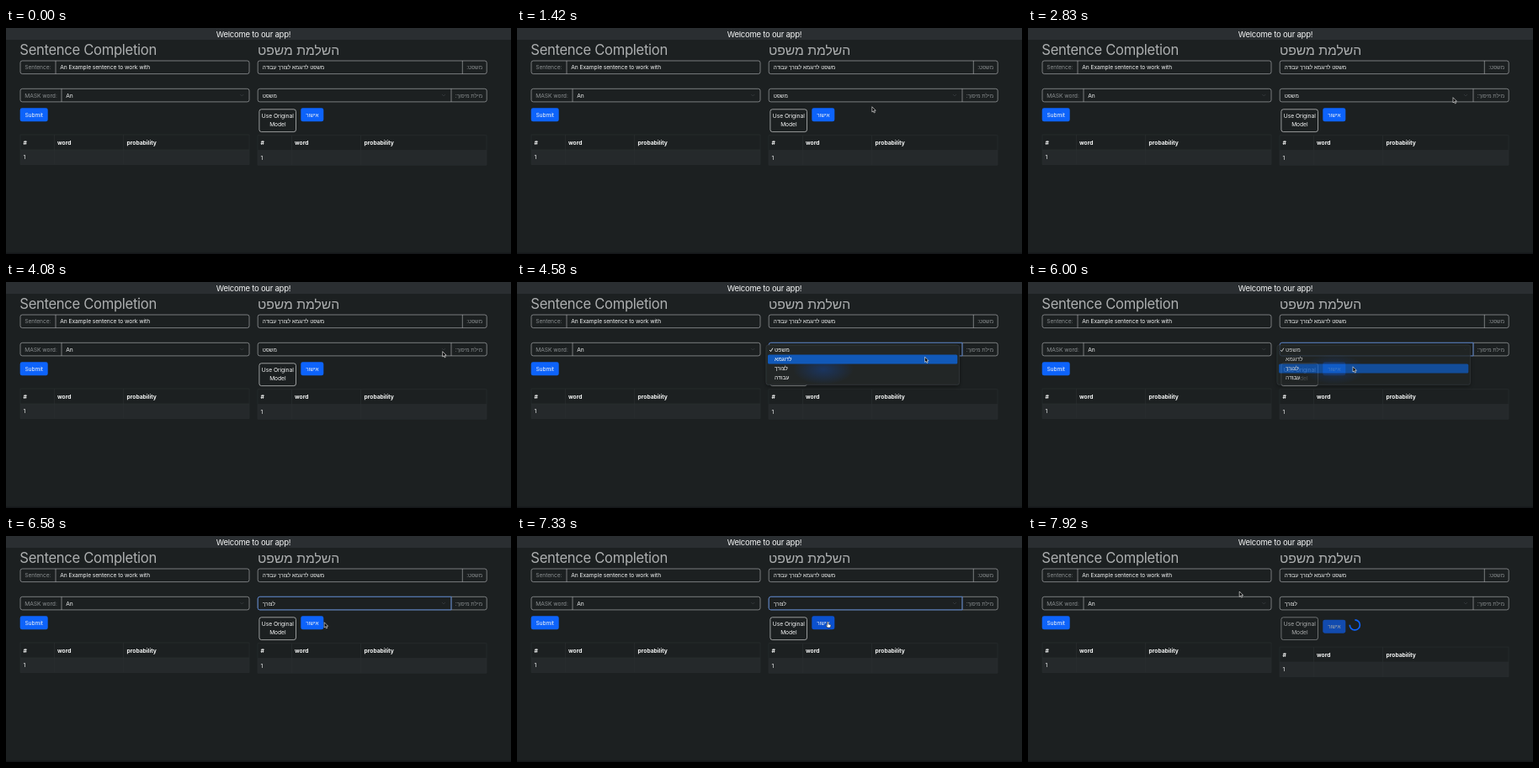
An HTML page that plays this animation: 600x269 px, repeating every 8000 ms.

```html
<!DOCTYPE html>
<html lang="en">
<head>
<meta charset="utf-8">
<title>Sentence Completion</title>
<style>
  html, body { margin: 0; width: 600px; height: 269px; overflow: hidden; background: #1c2021; }
  svg { display: block; }
  text { font: 6.7px Inter, "Liberation Sans", sans-serif; letter-spacing: -.01em; fill: #f4f5f5; }
  .he { font: 6.35px "Liberation Sans", sans-serif; letter-spacing: 0; }
  .title { font-size: 16.6px; letter-spacing: -.018em; fill: #aeb0b1; }
  .title.he { font-size: 15.7px; letter-spacing: 0; }
  .label { fill: #8b8f91; }
  .bar { font-size: 9.5px; letter-spacing: -.025em; }
  .mid { text-anchor: middle; }
  .box { fill: none; stroke: #c6c9cb; stroke-width: .55; }
  .thin { fill: none; stroke: #2b2f31; stroke-width: .6; }
  .chevron { fill: none; stroke: #3b4043; stroke-width: .7; }
  .blue { fill: #0d63fb; }
  .head text { font-weight: 700; letter-spacing: 0; }
  #items text { font-size: 6.7px; fill: #fff; }
</style>
</head>
<body>
<svg width="600" height="269" viewBox="0 0 600 269">
  <defs>
    <g id="table">
      <rect y="18" width="272" height="17.5" fill="#25292b"/>
      <path class="thin" d="M0 0H272V35.5H0ZM0 18H272M40.5 0V35.5M122.5 0V35.5"/>
      <g class="head">
        <text x="3.5" y="11.5">#</text>
        <text x="44" y="11.5">word</text>
        <text x="126.5" y="11.5">probability</text>
      </g>
      <text x="3.5" y="29.3">1</text>
    </g>
    <radialGradient id="glow">
      <stop offset="0" stop-color="#0d50c8" stop-opacity=".36"/>
      <stop offset="1" stop-color="#0d50c8" stop-opacity="0"/>
    </radialGradient>
    <filter id="shadow" x="-10%" y="-30%" width="120%" height="170%">
      <feDropShadow dx="0" dy="1.5" stdDeviation="2.5" flood-opacity=".45"/>
    </filter>
  </defs>

  <rect width="600" height="14" fill="#2a2e31"/>
  <text class="bar mid" x="294" y="10.8">Welcome to our app!</text>
  <rect y="267.5" width="600" height="1.5" fill="#15171a"/>

  <text class="title" x="16.3" y="31.8">Sentence Completion</text>
  <rect class="box" x="17" y="39" width="272" height="15.6" rx="2.4"/>
  <path class="box" d="M59 39v15.6"/>
  <text class="label" x="22.3" y="49.3">Sentence:</text>
  <text x="64.3" y="49.3">An Example sentence to work with</text>
  <rect class="box" x="17" y="72.3" width="272" height="15.6" rx="2.4"/>
  <path class="box" d="M66 72.3v15.6"/>
  <text class="label" x="22.3" y="82.6">MASK word:</text>
  <text x="71.3" y="82.6">An</text>
  <path class="chevron" d="M278.3 79l2 2 2-2"/>
  <rect class="blue" x="16.7" y="95.3" width="33" height="16" rx="2.4"/>
  <text class="mid" x="33.2" y="105.8">Submit</text>
  <use href="#table" x="17" y="127"/>

  <text class="title he" x="299" y="31.8">השלמת משפט</text>
  <rect class="box" x="299.2" y="39" width="272" height="15.6" rx="2.4"/>
  <path class="box" d="M542.3 39v15.6"/>
  <text class="he" x="304.8" y="49.2">משפט לדוגמא לצורך עבודה</text>
  <text class="label he" x="566" y="49.2" direction="rtl">משפט:</text>
  <rect class="box" x="299.2" y="72.3" width="272" height="15.6" rx="2.4"/>
  <path class="box" d="M529 72.3v15.6"/>
  <path id="focus" d="M529 72.3H301.6q-2.4 0-2.4 2.4v10.8q0 2.4 2.4 2.4H529Z" fill="none" stroke="#4774c4" stroke-width=".9"/>
  <text class="he" id="value" x="304.8" y="82.5"></text>
  <path class="chevron" d="M518 79l2 2 2-2"/>
  <text class="label he" x="566" y="82.5" direction="rtl">מילת מיסוך:</text>
  <g id="model">
    <rect x="300.9" y="96.8" width="43.6" height="26.8" rx="2.6" fill="none" stroke="#eceeef" stroke-width=".6"/>
    <text class="mid" x="322.8" y="107">Use Original</text>
    <text class="mid" x="322.8" y="117.4">Model</text>
  </g>
  <g id="confirm">
    <rect id="confirmFill" class="blue" x="350.3" y="95.3" width="27" height="16" rx="2.4"/>
    <text class="he mid" x="363.8" y="105.6">אישור</text>
  </g>
  <path id="spinner" d="M4.28-4.28A6.05 6.05 0 1 0 4.28 4.28" fill="none" stroke="#0d63fb" stroke-width="1.7"/>
  <use id="rightTable" href="#table" x="299"/>

  <g id="menu">
    <rect x="296" y="75" width="229.5" height="47.3" rx="2.6" fill="#222628" stroke="#3c4042" stroke-width=".6" filter="url(#shadow)"/>
    <ellipse cx="364" cy="104" rx="36" ry="18" fill="url(#glow)"/>
    <rect id="highlight" x="298" width="225.3" height="11.1" rx="1.6" fill="#1159b9"/>
    <path d="M300.2 81l1.3 1.7 2.4-4" fill="none" stroke="#fff" stroke-width=".9"/>
    <g id="items"></g>
  </g>

  <path id="arrow" d="M0 0V6.2L1.4 5 2.4 7.2 3.5 6.7 2.5 4.5H4.4Z" fill="#000" stroke="#fff" stroke-width=".6"/>
  <path id="hand" d="M-.9-2.4q.7-.7 1.3 0V0l2.4.5q.8.3.6 1.2L2.8 4H-.6L-2.4 1.4q0-.9 1.5.1Z" fill="#fff" stroke="#111" stroke-width=".5"/>
</svg>
<script>
const LOOP = 8000;
const OPEN = 4250, PICK = 5940, CLOSED = 6240, CLICK = 7450;
const words = ['משפט', 'לדוגמא', 'לצורך', 'עבודה'];
// time, x, y of the pointer
const path = [
  [170, 385, 272], [600, 396, 112], [920, 403, 97], [1000, 403, 97], [1700, 432, 92],
  [2170, 432, 92], [2830, 505, 82.7], [3000, 505, 82.7], [3600, 518.7, 82.7],
  [4350, 518.7, 82.7], [5000, 400.8, 105.3], [5450, 400.8, 105.3], [5850, 386, 100.8],
  [6330, 386, 100.8], [6850, 369.5, 105], [CLICK, 369.5, 105], [7900, 251.2, 66]
];
const el = id => document.getElementById(id);
const show = (id, opacity) => el(id).setAttribute('opacity', +opacity);
const place = (id, x, y, turn = 0) =>
  el(id).setAttribute('transform', `translate(${x} ${y}) rotate(${turn})`);

el('items').innerHTML = words
  .map((word, i) => `<text class="he" x="306" y="${83 + i * 11.1}">${word}</text>`).join('');

function pointerAt(t) {
  const next = path.findIndex(point => point[0] > t);
  if (next < 1) return path[next ? path.length - 1 : 0].slice(1);
  const [t0, x0, y0] = path[next - 1], [t1, x1, y1] = path[next];
  const u = (t - t0) / (t1 - t0), k = u * u * (3 - 2 * u);
  return [x0 + (x1 - x0) * k, y0 + (y1 - y0) * k];
}

function draw(t) {
  const [x, y] = pointerAt(t);
  const loading = t >= CLICK;
  const hover = t > CLOSED && !loading && x < 377;
  const drop = loading ? 4.4 : 0;

  const fade = t < OPEN ? 0 : Math.max(0, Math.min(1, (CLOSED - t) / (CLOSED - PICK)));
  show('menu', fade);
  const row = t >= 5000 ? 2 : Math.max(0, Math.min(2, Math.floor((y - 75.3) / 11.1)));
  el('highlight').setAttribute('y', 75.3 + row * 11.1);

  el('value').textContent = words[t < PICK ? 0 : 2];
  show('focus', t >= OPEN && !loading);
  show('value', fade ? 0 : 1);

  el('confirmFill').style.fill = hover ? '#0b51cf' : '';
  show('confirm', loading ? .65 : 1);
  show('model', loading ? .65 : 1);
  show('spinner', loading);
  place('confirm', 0, drop);
  place('spinner', 388.3, 105.9, (t - CLICK) / 750 * 360);
  place('rightTable', 0, 127.7 + drop);

  show('arrow', t >= 170 && !hover);
  show('hand', hover);
  place('arrow', x, y);
  place('hand', x, y);
}

function tick() {
  draw(performance.now() % LOOP);
  requestAnimationFrame(tick);
}
tick();
</script>
</body>
</html>
```
